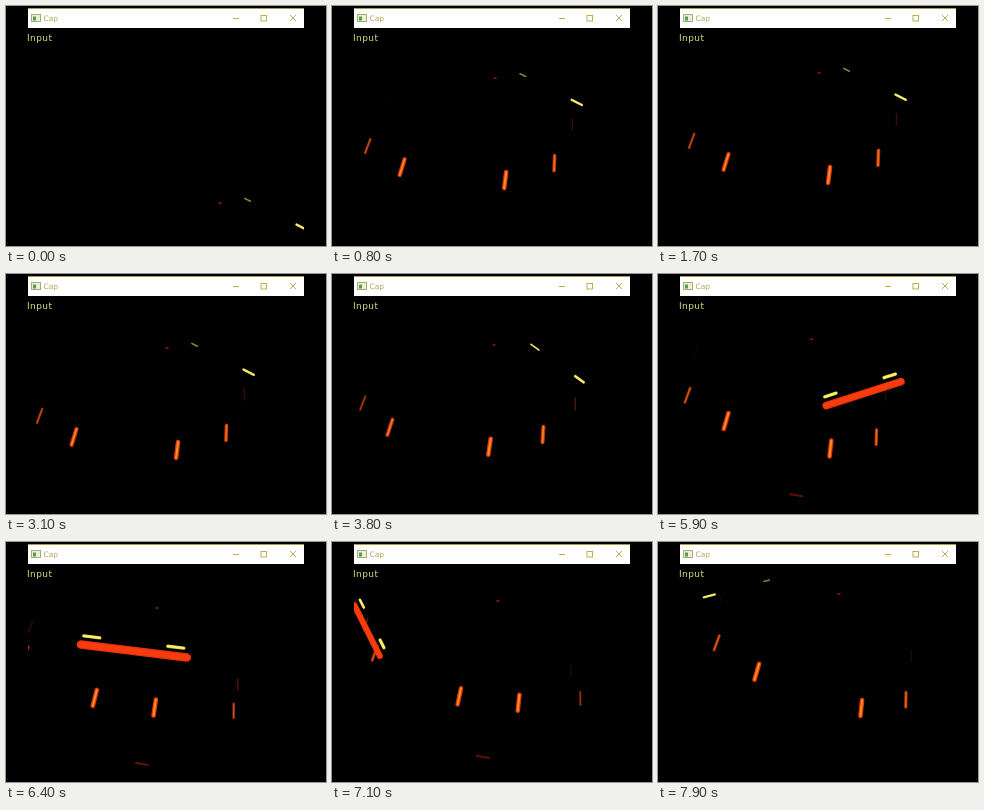
Write an HTML page that moves like this. It is 320x240 px and loops after 8 s.

```html
<!DOCTYPE html>
<html lang="en">
<head>
<meta charset="utf-8">
<title>Camera input</title>
<style>
html, body { margin: 0; width: 100%; height: 100%; overflow: hidden; background: #000; }
svg { display: block; width: 100vw; height: 100vh; }
line { stroke-linecap: round; }
</style>
</head>
<body>
<svg viewBox="0 0 320 240">
  <defs>
    <clipPath id="view"><rect x="22" y="22" width="276" height="209"/></clipPath>
    <filter id="soft" filterUnits="userSpaceOnUse" x="0" y="0" width="320" height="240"><feGaussianBlur stdDeviation="0.5"/></filter>
  </defs>
  <rect width="320" height="240"/>
  <g clip-path="url(#view)"><g id="lights" filter="url(#soft)"></g></g>
  <rect x="22" y="2" width="276" height="1" fill="#a89a50"/>
  <rect x="22" y="3" width="276" height="19" fill="#fff"/>
  <g fill="none" stroke="#b5a83c" stroke-width="0.9">
    <path d="M227 12.5H233M284 9L290 15M290 9L284 15"/>
    <rect x="255" y="9.5" width="5.5" height="5.5"/>
  </g>
  <rect x="25.5" y="8.5" width="9" height="7" fill="#eef0d4" stroke="#a3ab78" stroke-width="1"/>
  <rect x="27" y="10.5" width="3" height="4" fill="#5a9a58"/>
  <text x="37.5" y="15" font-family="'DejaVu Sans', sans-serif" font-size="7.5" fill="#b0a65a">Cap</text>
  <text x="21" y="34.7" font-family="'DejaVu Sans', sans-serif" font-size="9" letter-spacing="0.4" fill="#dede88">Input</text>
</svg>
<script>
const LOOP = 8000, STEP = 100;
const PAN = { x: 53, y: 130, time: 1000 };
const RING = { radius: 104, squash: 0.45, spread: 30, sag: 24 };
const HEAD = { lag: 5, mark: 42, bar: 53, lift: 6, frontLift: 56 };
const AMBER = ["#d83808", "#ff8a28"];
const RED = ["#e23208", "#f83c10"];
const DIM = ["#8c1608", "#8c1608"];
const YELLOW = ["#c8b828", "#f8f070"];

// Pose of the turning robot: time, centre x, centre y, camera roll, heading in degrees
const poses = [
  [1700, 136, 116, -0.03, -35],
  [3100, 136, 123, -0.03, -35],
  [3800, 137, 120, 0, -27],
  [5200, 137, 112, 0.13, 0],
  [6400, 126, 115, 0.13, 94],
  [7900, 156, 101, 0.22, 228]
];

const group = document.getElementById("lights");
const clamp = (v, lo = 0, hi = 1) => Math.min(hi, Math.max(lo, v));
const rad = degrees => degrees * Math.PI / 180;

function makeLight(tone) {
  const lines = tone.map(color => {
    const line = document.createElementNS("http://www.w3.org/2000/svg", "line");
    line.setAttribute("stroke", color);
    return group.appendChild(line);
  });
  const core = tone === AMBER ? 0.45 : 0.7;
  return (x, y, dx, dy, width, glow) => lines.forEach((line, i) => {
    const values = {
      x1: x - dx, y1: y - dy, x2: x + dx, y2: y + dy,
      "stroke-width": i ? width * core : width,
      opacity: i ? glow * glow : glow
    };
    for (const name in values) line.setAttribute(name, values[name].toFixed(2));
  });
}

const armour = Array.from({ length: 8 }, () => makeLight(AMBER));
const bar = makeLight(RED);
const marks = [makeLight(YELLOW), makeLight(YELLOW)];
const roof = makeLight(RED);
const reflection = makeLight(DIM);

function slope(i, c) {
  const a = poses[i - 1], b = poses[i + 1];
  return a && b ? (b[c] - a[c]) / (b[0] - a[0]) : 0;
}

// Smooth curve through the poses
function poseAt(t) {
  const time = clamp(t, poses[0][0], poses[poses.length - 1][0]);
  const i = Math.max(0, poses.findIndex(p => p[0] >= time) - 1);
  const a = poses[i], b = poses[i + 1], span = b[0] - a[0];
  const u = (time - a[0]) / span, v = 1 - u;
  const [cx, cy, roll, heading] = [1, 2, 3, 4].map(c =>
    a[c] * v * v * (1 + 2 * u) + b[c] * u * u * (3 - 2 * u)
    + span * u * v * (v * slope(i, c) - u * slope(i + 1, c)));
  return { cx, cy, roll, heading };
}

// Point on a side plate, shifted along the plate from its middle
function platePoint(pose, angle, shift) {
  const c = Math.cos(angle), s = Math.sin(angle);
  const across = RING.radius * c - shift * s;
  const depth = RING.radius * s + shift * c;
  return {
    x: pose.cx + across,
    y: pose.cy + depth * RING.squash + across * pose.roll,
    across: across / RING.radius,
    depth: depth / RING.radius
  };
}

function drawArmour(pose) {
  armour.forEach((light, i) => {
    const angle = rad(pose.heading + 90 * (i >> 1));
    const p = platePoint(pose, angle, i % 2 ? RING.spread : -RING.spread);
    const sag = RING.sag * Math.max(0, Math.cos(angle)) ** 2;
    const glow = clamp(0.45 + 0.62 * p.depth);
    const half = 5 + 3 * glow;
    const lean = (1.5 - 1.5 * p.across) * half / 8;
    light(p.x, p.y + sag, -lean, half, 1 + 3.6 * glow * glow, glow);
  });
}

function drawHead(pose) {
  const angle = rad(pose.heading - HEAD.lag);
  const c = Math.cos(angle), s = Math.sin(angle);
  const front = Math.max(0, s);
  const lift = HEAD.lift + HEAD.frontLift * front;
  const along = { x: -s, y: c * RING.squash - s * pose.roll };
  const mid = platePoint(pose, angle, 0);
  const lit = clamp((s + 0.45) * 4);
  bar(mid.x + 5 * c, mid.y - lift + 6 + 3 * front,
    along.x * HEAD.bar, along.y * HEAD.bar, 5.5 + 3 * front, lit);
  marks.forEach((mark, i) => {
    const p = platePoint(pose, angle, i ? HEAD.mark : -HEAD.mark);
    const glow = clamp(5.3 + 5 * p.depth, 0.5);
    const half = 8 * glow;
    const width = 1.6 + 1.8 * clamp(p.depth + 0.8);
    mark(p.x, p.y - lift, along.x * half, along.y * half, width, glow);
  });
  reflection(pose.cx + 10, pose.cy + 107, 6, 1, 2, 0.6 * lit);
}

function draw(time) {
  const t = Math.floor(time % LOOP / STEP) * STEP;
  const rest = (1 - clamp(t / PAN.time)) ** 2;
  const pose = poseAt(t);
  pose.cx += PAN.x * rest;
  pose.cy += PAN.y * rest;
  drawArmour(pose);
  drawHead(pose);
  roof(pose.cx + 25, pose.cy - 49, 1, 0, 1.5, 0.5);
}

const start = performance.now();
function tick() {
  draw(performance.now() - start);
  requestAnimationFrame(tick);
}
tick();
</script>
</body>
</html>
```
